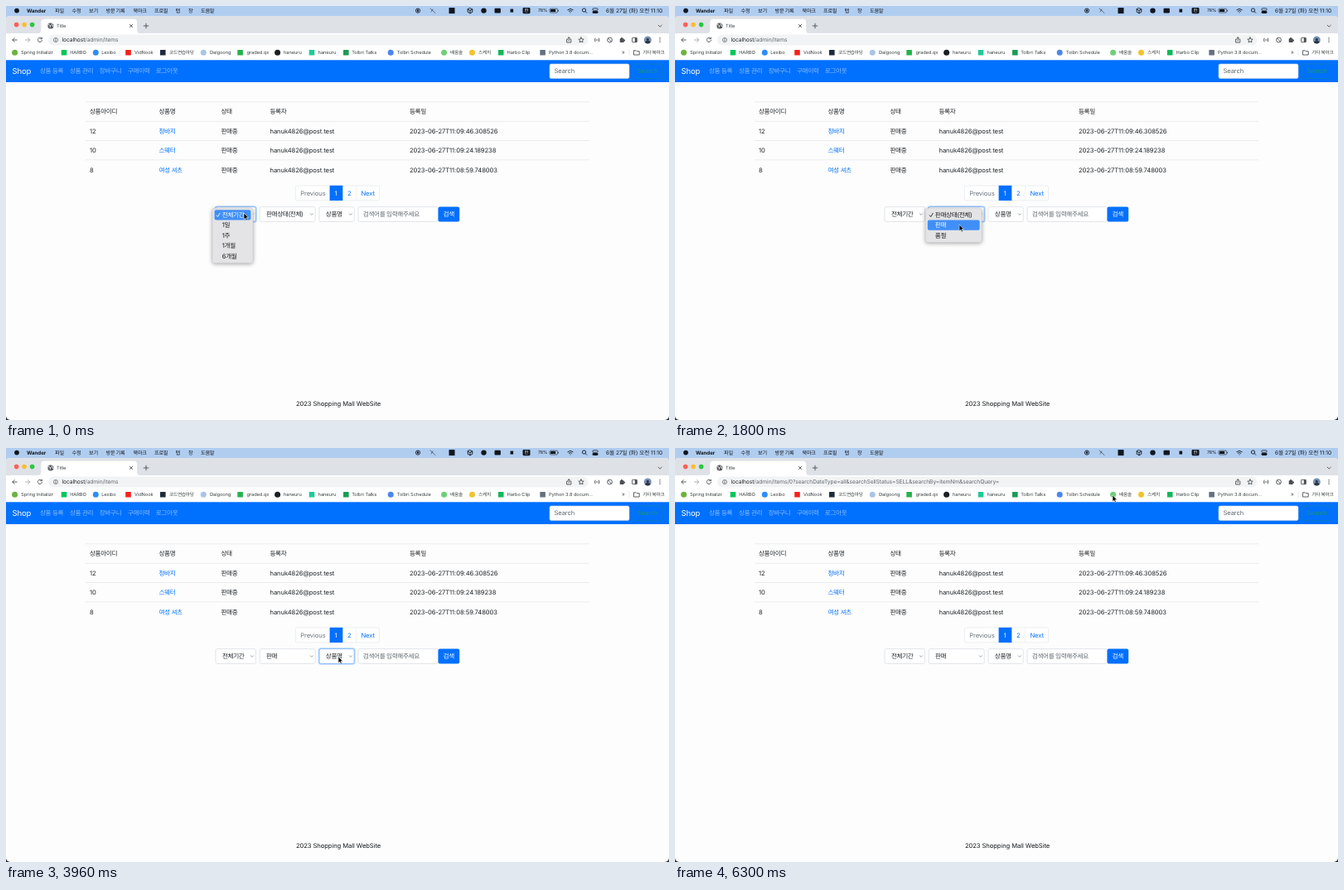
An HTML page that plays this animation: 800x500 px, repeating every 6.36 s.

```html
<!DOCTYPE html>
<html lang="ko">
<head>
<meta charset="utf-8">
<title>Shop admin</title>
<style>
html, body { margin: 0; width: 100%; height: 100%; overflow: hidden; background: #b0cdf0; }
svg { display: block; width: 800px; height: 500px; }
text {
  font-family: Inter, "Noto Sans CJK KR", "Noto Sans CJK", sans-serif;
  letter-spacing: -.01em;
  text-rendering: geometricPrecision;
  white-space: pre;
}
.k { letter-spacing: -.05em; }
.line { fill: none; stroke: #4b4e52; stroke-width: .9; stroke-linecap: round; stroke-linejoin: round; }
.dark { fill: none; stroke: #10161f; stroke-width: .9; stroke-linecap: round; stroke-linejoin: round; }
.panel { filter: drop-shadow(0 1.5px 2.5px rgba(0, 0, 0, .35)); }
</style>
</head>
<body>
<svg viewBox="0 0 800 500">
  <g id="shell"></g>
  <g id="page"></g>
  <path id="cursor" d="M0 0V7.7L1.8 6.1 3 8.9 4.3 8.3 3.1 5.6H5.5Z" fill="#000" stroke="#fff" stroke-width=".55"/>
</svg>
<script>
const LOOP = 6360, STEP = 60;
const BLUE = '#0070ff', INK = '#212529', GRAY = '#6c757d', RULE = '#dee2e6';

// Text is placed by its left edge and vertical middle.
const text = (x, y, s, size = 7.62, fill = INK, extra = '') =>
  `<text x="${x}" y="${(y + size * .35).toFixed(2)}" font-size="${size}" fill="${fill}" ` +
  `class="${/[가-힣]/.test(s) ? 'k' : ''}" ${extra}>${s.replace(/&/g, '&amp;')}</text>`;
const rect = (x, y, w, h, fill, r = 0, extra = '') =>
  `<rect x="${x}" y="${y}" width="${w}" height="${h}" rx="${r}" fill="${fill}" ${extra}/>`;
const dot = (x, y, r, fill, extra = '') =>
  `<circle cx="${x}" cy="${y}" r="${r}" fill="${fill}" ${extra}/>`;
const path = (d, cls = 'line', extra = '') => `<path d="${d}" class="${cls}" ${extra}/>`;
const box = (x, y, w, h, stroke = '#ced4da', fill = '#fff') =>
  rect(x, y, w, h, fill, 2, `stroke="${stroke}" stroke-width=".6"`);

function menuBar() {
  const menus = [[59, '파일'], [79.5, '수정'], [100, '보기'], [120.5, '방문 기록'], [153.5, '북마크'],
    [179, '프로필'], [204.5, '탭'], [220, '창'], [235, '도움말']];
  return rect(0, 0, 800, 12, '#b0cdf0') +
    dot(13, 5.6, 2.9, '#10161f') +
    text(25, 5.6, 'Wander', 6.2, '#10161f', 'font-weight="700"') +
    menus.map(([x, s]) => text(x, 5.6, s, 6.2, '#10161f', 'font-weight="500"')).join('') +
    dot(497, 5.6, 2.6, 'none', 'stroke="#10161f" stroke-width=".9"') + dot(497, 5.6, 1.3, '#10161f') +
    path('M512 3L518 8.5M513 7L515 4', 'dark', 'opacity=".6"') +
    rect(534.5, 2.1, 7, 7, '#10161f') +
    path('M560 2.6L562.8 4V7.3L560 8.8 557.2 7.3V4ZM557.2 4L560 5.5 562.8 4M560 5.5V8.8', 'dark') +
    dot(576.5, 5.6, 3.2, '#10161f') +
    rect(589.5, 2.8, 7.4, 5.6, '#10161f', 1) +
    rect(608.5, 3.6, 3.6, 4, '#10161f') +
    rect(623.5, 2, 9, 7.2, '#10161f', 1.4) + text(625.4, 5.6, '한', 5.2, '#fff') +
    text(642, 5.6, '78%', 5.3, '#10161f') +
    rect(656, 3.2, 9.6, 4.8, 'none', 1.3, 'stroke="#10161f" stroke-width=".6"') +
    rect(657, 4.1, 6.2, 3, '#10161f', .6) + rect(666.2, 4.8, .7, 1.6, '#10161f') +
    path('M677.8 4.6Q681 1.9 684.2 4.6M679.2 6.2Q681 4.7 682.8 6.2M681 7.9V8', 'dark') +
    dot(697.5, 5, 2.1, 'none', 'stroke="#10161f" stroke-width=".9"') + path('M699.1 6.6L700.8 8.3', 'dark') +
    rect(707.8, 2.8, 6.4, 2.5, 'none', 1.2, 'stroke="#10161f" stroke-width=".7"') +
    rect(707.5, 6, 7, 2.9, '#10161f', 1.4) +
    text(724, 5.6, '6월 27일 (화) 오전 11:10', 6.55, '#10161f', 'style="letter-spacing:0"');
}

function toolbar() {
  return rect(0, 480, 800, 20, '#20242b') +
    rect(0, 11.5, 800, 488.5, '#fdfdfd', 5) +
    '<path d="M0 33V16.5Q0 11.5 5 11.5H795Q800 11.5 800 16.5V33Z" fill="#dee1e6"/>' +
    rect(0, 33, 800, 32.4, '#fff') +
    dot(12.6, 22.6, 2.8, '#fe5f57') + dot(22.1, 22.6, 2.8, '#febc2e') + dot(31.6, 22.6, 2.8, '#28c840') +
    '<path d="M38.5 33Q42.3 33 42.3 29V19.5Q42.3 15.7 46.1 15.7H154.4Q158.2 15.7 158.2 19.5V29Q158.2 33 162 33Z" fill="#fff"/>' +
    dot(53.9, 24, 3.5, '#53575c') + path('M51.5 22.6L53.8 23.6 53 25.8M55.2 21.6L56.3 24.6', 'line', 'style="stroke:#fff"') +
    text(61, 24.1, 'Title', 5.7, '#3c4043') +
    path('M149.4 22.4L152.6 25.6M152.6 22.4L149.4 25.6M166.2 24H171.8M169 21.2V26.8') +
    path('M787.2 23.2L789.2 25.2 791.2 23.2') +
    path('M13.2 41H7.8M10.2 38.6L7.8 41 10.2 43.4M42.9 39.2A2.6 2.6 0 1 0 43.5 41.4M43.4 38.2V39.7H41.9') +
    path('M23.4 41H28.8M26.4 38.6L28.8 41 26.4 43.4', 'line', 'style="stroke:#a5a8ac"') +
    rect(51, 34.4, 651.5, 13.2, '#f1f3f4', 6.6) +
    dot(60, 41, 2.6, 'none', 'stroke="#5f6368" stroke-width=".7"') + path('M60 40.9V42.3M60 39.6V39.7') +
    path('M677.6 40.2H676.6V44H681.8V40.2H680.8M679.2 42V37.8M677.8 39.1L679.2 37.7 680.6 39.1') +
    path('M694 37.9L695 40 697.2 40.2 695.5 41.7 696 43.9 694 42.8 692 43.9 692.5 41.7 690.8 40.2 693 40Z') +
    path('M711 39Q709.8 41 711 43M715.4 39Q716.6 41 715.4 43M712.2 41H714.2') +
    dot(728.5, 41, 2.9, 'none', 'stroke="#4b4e52" stroke-width=".9"') + path('M726.8 39.2L730.2 42.8') +
    rect(740.7, 39.3, 5, 4.6, '#4b4e52', .7) + dot(743, 39.2, 1.2, '#4b4e52') + dot(746, 41.6, 1.1, '#4b4e52') +
    rect(755.6, 38.3, 5.6, 5.4, 'none', .6, 'stroke="#4b4e52" stroke-width=".9"') + rect(758.8, 38.3, 2.6, 5.4, '#4b4e52') +
    dot(774.3, 41, 4.5, '#7590b4') + '<path d="M770.8 43.8Q774.3 39.4 777.8 43.8A4.5 4.5 0 0 1 770.8 43.8Z" fill="#2e3540"/>' +
    dot(774.3, 40.2, 1.5, '#2e3540') +
    [38.8, 41, 43.2].map(y => dot(789, y, .7, '#4b4e52')).join('');
}

function bookmarks() {
  // icon centre, icon colour, round?, text left, label
  const list = [
    [10.6, '#6db33f', 1, 18, 'Spring Initializr'], [70, '#03c75a', 0, 77.2, 'HARBO'],
    [108.3, '#2f8df5', 1, 115.2, 'Lexibo'], [147.5, '#f5221b', 0, 155, 'VidNook'],
    [189.3, '#1e2a3c', 0, 197, '코드연습마당'], [238.3, '#a9c4e6', 1, 246, 'Dalgoong'],
    [282.6, '#25b34b', 0, 290.5, 'graded.qx'], [327.6, '#1b1f23', 1, 335, 'haneuru'],
    [369, '#20c997', 0, 376.6, 'haneuru'], [410.3, '#1a9c55', 0, 417.2, 'Tolbri Talks'],
    [464.2, '#4c86ee', 1, 471.8, 'Tolbri Schedule'], [528.6, '#6fcf78', 1, 536, '배움솔'],
    [562.5, '#f3c22d', 1, 570, '스케치'], [597.2, '#12b85b', 0, 604.5, 'Harbo Clip'],
    [647.6, '#667180', 0, 655, 'Python 3.8 docum…']];
  return list.map(([cx, c, round, x, s]) =>
    (round ? dot(cx, 56.2, 3.5, c) : rect(cx - 3.3, 52.9, 6.6, 6.6, c, .5)) +
    text(x, 56.2, s, 5.7, '#3c4043')).join('') +
    text(743, 55.7, '»', 6.5, '#4b4e52') + rect(751.8, 52, .5, 8, '#d3d6da') +
    path('M757.8 53.8H760.3L761.2 54.7H764.2V59H757.8Z', 'line') +
    text(768.3, 56.2, '기타 북마크', 5.7, '#3c4043');
}

function navBar() {
  const links = [[41, '상품 등록'], [77, '상품 관리'], [112.8, '장바구니'], [147, '구매이력'], [180.8, '로그아웃']];
  return rect(0, 65.3, 800, 26.7, BLUE) +
    text(7.5, 79, 'Shop', 9.5, '#fff') +
    links.map(([x, s]) => text(x, 78.7, s, 7.62, '#8abcff')).join('') +
    box(656, 70, 96, 17.6) + text(661.4, 78.8, 'Search', 7.62, '#5f676e') +
    rect(756.9, 70, 35.3, 17.6, 'none', 2, 'stroke="#148a84" stroke-width=".5"') +
    text(762, 78.8, 'Search', 7.62, '#18976a');
}

document.getElementById('shell').innerHTML = toolbar() + menuBar() + bookmarks() + navBar() +
  text(350, 480.3, '2023 Shopping Mall WebSite', 7.62, '#15181b');

const MAIL = 'hanuk4826@post.test';
const PAGES = [
  { cols: [101, 184.5, 259.5, 318.5, 487], rows: [
    ['12', '청바지', '11:09:46.308526'], ['10', '스웨터', '11:09:24.189238'], ['8', '여성 셔츠', '11:08:59.748003']] },
  { cols: [101, 183, 268.5, 326, 491], rows: [
    ['6', '남성 티셔츠', '11:08:36.334469'], ['4', '남성 티셔츠', '11:08:15.217997'], ['2', '남성 셔츠', '11:07:38.484627']] }];
const HEAD = ['상품아이디', '상품명', '상태', '등록자', '등록일'];

// left, width, text left, open and close time, end of focus, panel width, options
const SELECTS = [
  { x: 253, w: 48.4, tx: 261, open: -300, shut: 1380, blur: 1560, pw: 49, opts: ['전체기간', '1일', '1주', '1개월', '6개월'] },
  { x: 306.2, w: 67, tx: 314, open: 1560, shut: 2040, blur: 2280, pw: 68, opts: ['판매상태(전체)', '판매', '품절'] },
  { x: 378, w: 42.2, tx: 385.8, open: 2280, shut: 3780, blur: 5040, pw: 42.5, opts: ['상품명', '등록자'] }];
const SEARCHED = 5040, TO_SECOND = 5460, TO_FIRST = 5700;

// time, x, y of the pointer tip
const TRAIL = [
  [0, 287, 250], [240, 284, 262], [480, 282, 274], [660, 284, 275], [900, 300, 262], [1140, 343, 251],
  [1260, 345, 252], [1560, 345, 252], [1800, 343, 264], [2040, 343, 264], [2220, 397, 247], [2340, 398, 247],
  [2700, 398, 250], [2940, 399, 260], [3120, 399, 260], [3360, 401, 252], [4080, 401, 252], [4320, 480, 110],
  [4500, 534, 3], [4680, 532.5, 1.5], [4920, 534, 250], [5220, 534, 251], [5400, 414, 228], [5460, 414, 228],
  [5580, 400, 227], [6000, 400, 227], [6300, 528, 57], [LOOP, 528, 57]];

const clamp = v => Math.max(0, Math.min(1, v));

function pointerAt(t) {
  const i = TRAIL.findIndex(k => k[0] > t);
  const [t0, x0, y0] = TRAIL[i - 1], [t1, x1, y1] = TRAIL[i];
  const p = (t - t0) / (t1 - t0), e = p * p * (3 - 2 * p);
  return { x: x0 + (x1 - x0) * e, y: y0 + (y1 - y0) * e };
}
const inside = (m, x, y, w, h) => m.x >= x && m.x < x + w && m.y >= y && m.y < y + h;

function table({ cols, rows }) {
  const cells = [HEAD, ...rows.map(([id, name, time]) => [id, name, '판매중', MAIL, '2023-06-27T' + time])];
  return cells.map((row, r) => {
    const y = 115.8 + r * 23.35;
    return rect(96, y - .25, 608, .6, RULE) +
      row.map((s, c) => text(cols[c], y + 12, s, 7.62, r && c === 1 ? BLUE : INK)).join('');
  }).join('');
}

function pager(current, m) {
  const items = [[349.3, 41.6, 355.2, 'Previous'], [390.9, 15.6, 396.4, '1'], [406.5, 16, 412.1, '2'], [422.5, 28, 428.4, 'Next']];
  const off = current ? 3 : 0;
  return box(349.3, 217, 101.2, 17.8, RULE) + items.map(([x, w, tx, s], i) => {
    const active = i === current + 1;
    const over = !active && i !== off && inside(m, x, 217, w, 17.8);
    return (active ? rect(x, 216.8, w, 18.2, BLUE) : over ? rect(x, 217.3, w, 17.2, '#e2e5e9') : '') +
      (i ? rect(x - .25, 217, .5, 17.8, active ? BLUE : RULE) : '') +
      text(tx, 226, s, 7.62, active ? '#fff' : i === off ? GRAY : BLUE);
  }).join('');
}

function select(s, t, label) {
  const ring = clamp((t - s.open + 30) / 150) * clamp(1 - (t - s.blur + 15) / 150);
  const cx = s.x + s.w - 4.4;
  return box(s.x, 242.6, s.w, 17.8) +
    (ring > 0 ? `<g opacity="${ring.toFixed(2)}">` +
      rect(s.x - .7, 241.9, s.w + 1.4, 19.2, 'none', 2.6, 'stroke="#b8d8ff" stroke-width="1.4"') +
      rect(s.x, 242.6, s.w, 17.8, 'none', 2, 'stroke="#74b2fc" stroke-width=".7"') + '</g>' : '') +
    text(s.tx, 251.5, label) +
    path(`M${cx - 1.6} 250.8L${cx} 252.4 ${cx + 1.6} 250.8`, 'line', 'style="stroke:#858a90;stroke-width:.8"');
}

function panel(s, t, m) {
  if (t < s.open || t >= s.shut) return '';
  const x = s.x - 4, h = s.opts.length * 12.4 + 4.2;
  const over = inside(m, x, 244.2, s.pw, h) ? Math.min(s.opts.length - 1, Math.max(0, Math.floor((m.y - 246) / 12.4))) : -1;
  return rect(x, 244.2, s.pw, h, '#e4e4e6', 3.2, 'class="panel" stroke="#c2c2c5" stroke-width=".4"') +
    s.opts.map((o, i) => {
      const y = 252.3 + i * 12.4, hot = i === over, ink = hot ? '#fff' : '#1c1c1e';
      return (hot ? rect(x + 2.6, y - 6.1, s.pw - 5.2, 12.2, '#408ff7', 2) : '') +
        (i ? '' : path(`M${x + 5} ${y + .6}L${x + 6.5} ${y + 2.2} ${x + 9} ${y - 2}`, 'line', `style="stroke:${ink}"`)) +
        text(s.tx - .2, y, o, 7.62, ink);
    }).join('');
}

function address(t, page) {
  const query = t < SEARCHED ? '' : `/${page}?searchDateType=all&searchSellStatus=SELL&searchBy=itemNm&searchQuery=`;
  const tail = `/admin/items${query}`.replace(/&/g, '&amp;');
  return `<text x="67.5" y="43.3" font-size="6.67" fill="#202124">localhost<tspan fill="#63676c">${tail}</tspan></text>`;
}

const pageLayer = document.getElementById('page'), cursor = document.getElementById('cursor');

function draw(t) {
  const m = pointerAt(t);
  const page = t >= TO_SECOND && t < TO_FIRST ? 1 : 0;
  const labels = ['전체기간', t < 2040 ? '판매상태(전체)' : '판매', '상품명'];
  const hot = inside(m, 521.5, 242.4, 25.7, 18.2);
  pageLayer.innerHTML = address(t, page) + table(PAGES[page]) + pager(page, m) +
    SELECTS.map((s, i) => select(s, t, labels[i])).join('') +
    box(425, 242.6, 96.5, 17.8) + text(430.8, 251.5, '검색어를 입력해주세요', 7.62, '#5f676e') +
    rect(521.5, 242.4, 25.7, 18.2, hot ? '#0062dd' : BLUE, 2) +
    text(527.6, 251.5, '검색', 7.62, '#fff', 'font-weight="500"') +
    SELECTS.map(s => panel(s, t, m)).join('');
  cursor.setAttribute('transform', `translate(${m.x.toFixed(2)} ${m.y.toFixed(2)})`);
}

let start = null, last = -1;
function tick(now) {
  if (start === null) start = now;
  const step = Math.floor(((now - start) % LOOP) / STEP);
  if (step !== last) draw((last = step) * STEP);
  requestAnimationFrame(tick);
}
draw(0);
requestAnimationFrame(tick);
</script>
</body>
</html>
```
